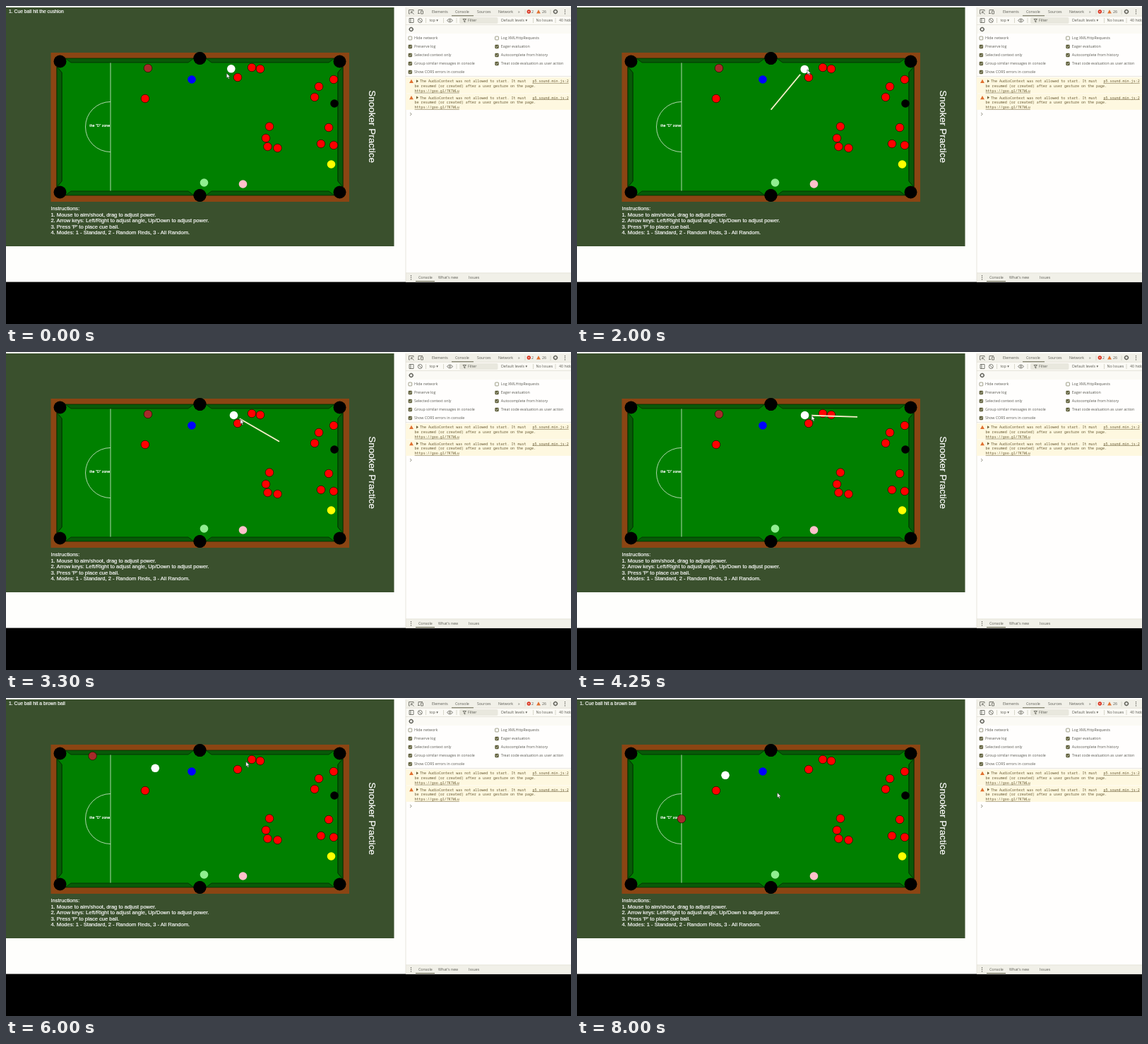
Recreate the animation shown at these times as an HTML page. Size 800 px wide and 450 px high, loop 8050 ms.

```html
<!DOCTYPE html>
<html lang="en">
<head>
<meta charset="utf-8">
<title>Snooker Practice</title>
<style>
html, body { margin: 0; width: 100%; height: 100%; overflow: hidden; background: #000; }
svg { display: block; width: 800px; height: 450px; }
text { white-space: pre; }
.game { font-family: "Liberation Sans", Arial, sans-serif; fill: #fff; stroke: #fff; stroke-width: .18; }
.panel { font: 5.3px "Open Sans", "Noto Sans", sans-serif; fill: #5c5c54; }
.code { font: 5.03px "Noto Sans Mono", "DejaVu Sans Mono", monospace; fill: #6a5c34; }
.link { text-decoration: underline; }
.icon { fill: none; stroke: #5c5c54; stroke-width: .8; }
.chalk { fill: none; stroke: #dcecd8; stroke-width: .8; }
</style>
</head>
<body>
<svg viewBox="0 0 800 450">
  <defs>
    <g id="quarter">
      <path d="M84 74H266L258 80H92ZM72 86L79 94V248L72 256Z" fill="#085a08" stroke="#022c02" stroke-width=".8"/>
      <circle cx="76.5" cy="78.5" r="9"/>
      <circle cx="274.5" cy="74" r="9"/>
    </g>
    <g id="half">
      <use href="#quarter"/>
      <use href="#quarter" transform="translate(0 342) scale(1 -1)"/>
    </g>
  </defs>

  <rect width="800" height="390.5" fill="#fefefc"/>
  <rect y="2" width="549.5" height="338" fill="#3a502d"/>

  <g class="game">
    <text id="message" x="4" y="10.4" font-size="6.78"></text>
    <text transform="translate(513.6 119.2) rotate(90)" font-size="13.5">Snooker Practice</text>
    <g font-size="7.59">
      <text x="63.4" y="289.4">Instructions:</text>
      <text x="63.4" y="297.9">1. Mouse to aim/shoot, drag to adjust power.</text>
      <text x="63.4" y="306.3">2. Arrow keys: Left/Right to adjust angle, Up/Down to adjust power.</text>
      <text x="63.4" y="314.8">3. Press 'P' to place cue ball.</text>
      <text x="63.4" y="323.2">4. Modes: 1 - Standard, 2 - Random Reds, 3 - All Random.</text>
    </g>
  </g>

  <rect x="63.5" y="66" width="422.5" height="211" fill="#8b4513"/>
  <rect x="72" y="74" width="405" height="194" fill="#008000"/>
  <path class="chalk" d="M148 74V268M148 135.5A35.5 35.5 0 0 0 148 206.5"/>
  <use href="#half"/>
  <use href="#half" transform="translate(549 0) scale(-1 1)"/>
  <text class="game" x="118.3" y="171.2" font-size="5.2">the "D" zone</text>
  <g id="balls" stroke-width=".7"></g>
  <path id="stick" d="M0 0H65" stroke="#f8efcc" stroke-width="1.9"/>

  <g class="panel">
    <rect x="566" y="2" width="234" height="388.5" fill="#fffefd"/>
    <rect x="566" y="2" width="234" height="12.3" fill="#f1f0e8"/>
    <rect x="566" y="14.3" width="234" height="24.7" fill="#fbfaf5"/>
    <rect x="566" y="378" width="234" height="12.5" fill="#f1f0e8"/>
    <path d="M566 2V390M566 14.3H800M566 26.5H800M566 99.5H800M566 377.8H800" fill="none" stroke="#dedcd0" stroke-width=".7"/>
    <path d="M631 13.8H662M580 389.6H607" fill="none" stroke="#64644c" stroke-width="1"/>
    <g class="icon">
      <path d="M572 11H570.5V5.5H577V7.5M573.5 8L577.5 11.5M573.5 8V10.5M573.5 8H576"/>
      <path d="M584 10V5.5H590M583 10.5H586M587.5 7H590.5V11H587.5Z"/>
      <path d="M571 17.5H577V23.5H571ZM573 17.5V23.5"/>
      <circle cx="586.3" cy="20.5" r="3"/><path d="M584.2 18.4L588.4 22.6"/>
      <path d="M624.5 20.5Q628.5 15.5 632.5 20.5Q628.5 25.5 624.5 20.5Z"/><circle cx="628.5" cy="20.5" r="1.1"/>
      <path d="M594.5 17V24M619.5 17V24M638 17V24M735 5V12M771 5V12M746.5 17V24M778 17V24" stroke="#d0cec0"/>
      <rect x="642" y="16" width="54.5" height="9" rx="2" fill="#e9e8de" stroke="none"/>
      <path d="M647 18.5H651.5L649.8 20.5V23L648.6 22V20.5Z"/>
      <g stroke-width="1.3"><circle cx="573.7" cy="33" r="2.4"/><circle cx="778" cy="8" r="2.4"/></g>
      <path d="M573.7 29.5V36.5M570.2 33H577.2M778 4.5V11.5M774.5 8H781.5" stroke-dasharray="1.1 4.8"/>
      <path d="M791.5 5V11.5M573.5 381V387.5" stroke-width="1.2" stroke-dasharray="1.2 1.4"/>
      <path d="M572 151L574.3 153L572 155" stroke="#808070"/>
    </g>
    <circle cx="740.3" cy="8" r="2.7" fill="#d9301c"/>
    <path d="M739.2 6.9L741.4 9.1M741.4 6.9L739.2 9.1" stroke="#fff" stroke-width=".6"/>
    <path d="M754 5.3L756.9 10.6H751.1Z" fill="#e07030"/>
    <g id="labels"></g>
    <g id="checks"></g>
  </g>
  <g id="warnings" class="code"></g>
  <path id="pointer" d="M0 0V7L1.6 5.6L2.8 8.3L4 7.7L2.8 5.2H5Z" fill="#fff" stroke="#222" stroke-width=".5"/>
</svg>

<script>
const LOOP = 8050, STEP = 50;
const STOP = 1850, AIM = 2150, SHOT = 5061, HIT = 5476, POTTED = 6448;
const TAU = 830, POWER = 280, LAST_ANGLE = 129.7;
const $ = id => document.getElementById(id);

function add(parent, tag, attrs, text = "") {
  const el = document.createElementNS("http://www.w3.org/2000/svg", tag);
  for (const key in attrs) el.setAttribute(key, attrs[key]);
  el.textContent = text;
  parent.append(el);
  return el;
}
const ball = (x, y, fill, stroke = "none") =>
  add($("balls"), "circle", { cx: x, cy: y, r: 5.8, fill, stroke });
const move = (el, x, y) => { el.setAttribute("cx", x); el.setAttribute("cy", y); };

[[348, 87], [360, 89], [328, 101], [464, 104], [443, 114], [437, 129], [197, 131],
 [373, 170.5], [457, 172], [368, 187], [370.5, 199], [384.5, 201], [446, 195], [464, 197]]
  .forEach(([x, y]) => ball(x, y, "#f00", "#300400"));
ball(263, 104, "#00f");
ball(465, 138, "#000");
ball(460.5, 224, "#ff0");
ball(280.5, 250, "#90ee90");
ball(335.5, 252, "#ffc0cb");
const brown = ball(201, 88, "#a52a2a", "#300400");
const cue = ball(319, 89, "#fff");

[["Elements", 603, 10], ["Console", 636, 10], ["Sources", 667, 10], ["Network", 697, 10], ["»", 725, 10],
 ["2", 744, 10], ["26", 759, 10], ["top ▾", 599.5, 22.3], ["Filter", 654, 22.3], ["Default levels ▾", 701, 22.3],
 ["No Issues", 750.5, 22.3], ["40 hidden", 783, 22.3],
 ["Console", 584, 386], ["What's new", 612, 386], ["Issues", 655, 386]]
  .forEach(([text, x, y]) => add($("labels"), "text", { x, y }, text));

function check(label, x, y, on) {
  const g = $("checks");
  add(g, "rect", { x: x - 2.4, y: y - 2.4, width: 4.8, height: 4.8, rx: .8,
    fill: on ? "#60603c" : "#fff", stroke: "#60603c", "stroke-width": .6 });
  if (on) add(g, "path", { d: `M${x - 1.4} ${y}l1 1.1l1.9 -2.2`, fill: "none", stroke: "#fff", "stroke-width": .7 });
  add(g, "text", { x: x + 5.8, y: y + 1.9 }, label);
}
["Hide network", "Preserve log", "Selected context only", "Group similar messages in console", "Show CORS errors in console"]
  .forEach((label, i) => check(label, 572.3, 45.5 + 12 * i, i > 0));
["Log XMLHttpRequests", "Eager evaluation", "Autocomplete from history", "Treat code evaluation as user action"]
  .forEach((label, i) => check(label, 695, 45.5 + 12 * i, i > 0));

for (const y of [101, 124.3]) {
  const g = $("warnings");
  const line = (text, x, dy, cls = "") => add(g, "text", { x, y: y + dy, class: cls }, text);
  add(g, "rect", { x: 566, y, width: 234, height: 22.6, fill: "#fef8e0" });
  add(g, "path", { d: `M574 ${y + 2.8}l2.9 5.2h-5.8Z`, fill: "#e07030" });
  add(g, "path", { d: `M581 ${y + 3.2}l3 2.1l-3 2.1Z` });
  line("The AudioContext was not allowed to start. It must", 586, 7.2);
  line("p5.sound.min.js:2", 745.5, 7.2, "link");
  line("be resumed (or created) after a user gesture on the page.", 578.6, 14);
  line("https://goo.gl/7K7WLu", 578.6, 20.8, "link");
}

// Eased interpolation over [time, x, y] keys
const pointerKeys = [[0, 312.3, 95], [1000, 322.3, 90], [2000, 326, 90], [3300, 331.9, 94.9],
  [4200, 332, 89.8], [5000, 341.3, 89.8], [5250, 341.3, 90], [6800, 338, 90], [8000, 283.6, 134]];
function pointerAt(t) {
  const i = pointerKeys.findIndex(k => k[0] > t);
  if (i < 0) return pointerKeys.at(-1).slice(1);
  const [t0, x0, y0] = pointerKeys[i - 1], [t1, x1, y1] = pointerKeys[i];
  const p = (t - t0) / (t1 - t0), e = p * p * (3 - 2 * p);
  return [x0 + (x1 - x0) * e, y0 + (y1 - y0) * e];
}

// Fraction of a rolling ball's total distance covered after ms
const roll = ms => 1 - Math.exp(-Math.max(ms, 0) / TAU);

function cueAt(t) {
  if (t < SHOT) return [322.6 - 3.8 * Math.exp(-t / TAU), 89.5 - .7 * Math.exp(-t / TAU)];
  if (t < HIT) return [322.6 - POWER * roll(t - SHOT), 89.5];
  const p = roll(t - HIT);
  return [212.5 - 2.6 * p, 89.6 + 20.7 * p];
}
function brownAt(t) {
  if (t >= POTTED) return [148, 171];
  const d = 168 * roll(t - HIT);
  return [201 - .997 * d, 88 - .076 * d];
}

// The stick keeps its last angle until the pointer aims it; dragging pulls it back
function placeStick(t, x, y, px, py) {
  const dx = px - x, dy = py - y;
  const angle = t < AIM ? LAST_ANGLE : Math.atan2(dy, dx) * 180 / Math.PI;
  const gap = Math.max(9.5, Math.hypot(dx, dy) - 1.5);
  $("stick").setAttribute("transform", `translate(${x} ${y}) rotate(${angle}) translate(${gap})`);
  $("stick").style.display = t >= STOP && t < SHOT ? "" : "none";
}

function draw(now) {
  const t = Math.floor(Math.max(now - start, 0) % LOOP / STEP) * STEP;
  const [x, y] = cueAt(t), [px, py] = pointerAt(t);
  move(cue, x, y);
  move(brown, ...brownAt(t));
  placeStick(t, x, y, px, py);
  $("message").textContent = t < STOP ? "1. Cue ball hit the cushion"
    : t >= HIT ? "1. Cue ball hit a brown ball" : "";
  $("pointer").setAttribute("transform", `translate(${px} ${py})`);
  requestAnimationFrame(draw);
}
const start = performance.now();
draw(start);
</script>
</body>
</html>
```
